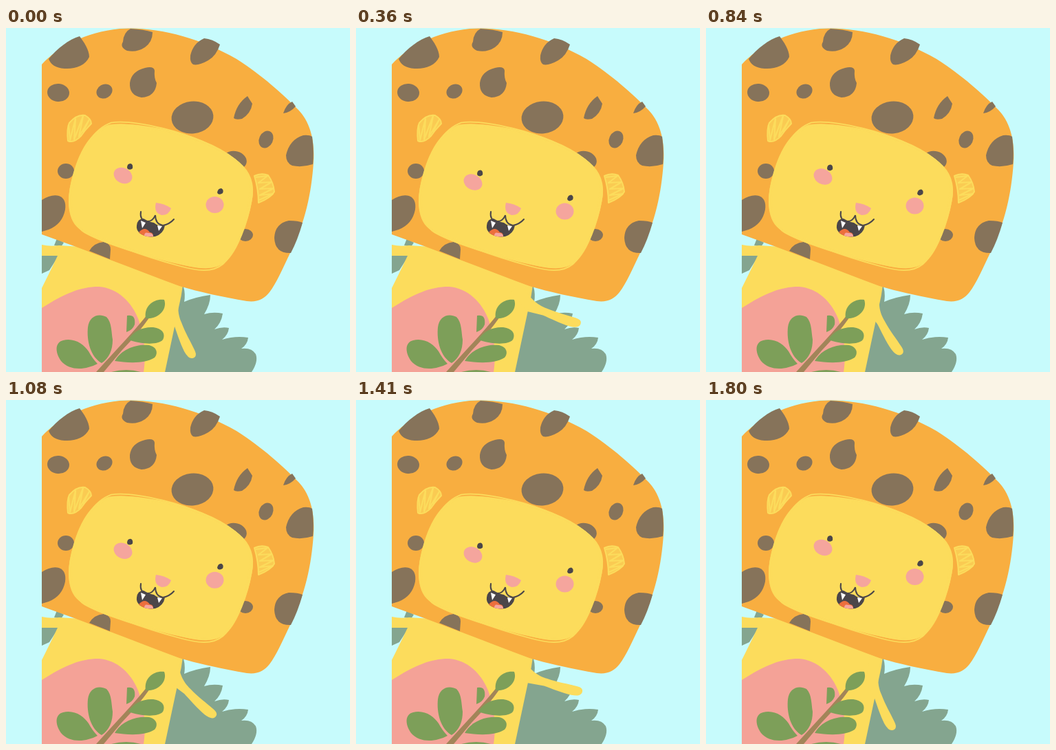
An HTML page for the animation above (1.83 s loop, 500x500 px).

```html
<!DOCTYPE html>
<html>
<head>
<meta charset="utf-8">
<style>
html, body { margin: 0; width: 100%; height: 100%; overflow: hidden; background: #c7fbfc; }
svg { display: block; width: 100vw; height: 100vh; }
</style>
</head>
<body>
<svg viewBox="0 0 500 500">
  <defs>
    <clipPath id="crop"><path d="M52 0H500V500H52Z"/></clipPath>
    <path id="outline" d="M150 144C170 140 200 145 225 150C270 159 311 176 336 196C355 211 359 230 355 250C350 280 335 322 318 337C302 350 280 347 255 341C200 328 140 309 111 292C90 279 92 246 97 225C105 190 120 155 150 144Z"/>
  </defs>
  <g clip-path="url(#crop)">
    <g id="bush" fill="#84a58f">
      <path d="M230 500L252 376L258 376Q261 387 259 398Q275 391 297 388Q297 401 288 416Q301 412 315 415Q313 429 303 438Q314 434 324 436Q323 446 314 453Q333 447 352 450Q351 460 342 466Q357 464 363 474Q367 485 357 500Z"/>
      <path d="M52 329H78L63 352L52 357ZM70 316L74 306L84 312L80 318Z"/>
    </g>
    <g id="body" fill="#fcdc5c">
      <path d="M52 315Q64 318 77 316L110 318L257 374Q255 390 251 406L231 500H52V378Q66 350 75 331H52Z"/>
      <path fill="#f4a297" d="M52 407C85 386 108 376 135 376C162 378 183 398 193 425C203 455 203 480 200 500H52Z"/>
    </g>
    <path id="arm" fill="#fcdc5c" d="M257 374C248 400 249 414 255 428C261 444 268 455 274 468Q279 478 271 480Q265 481 259 470C253 458 248 442 244 431L232 410L238 374Z"/>
    <g id="plant" fill="#7d9f59">
      <path fill="#a28559" d="M131 500L163 465Q190 436 205 417L209 420Q193 443 168 469L142 500Z"/>
      <path d="M203 422C200 404 215 393 230 395C235 409 221 424 203 422Z"/>
      <path d="M176 418Q189 416 187 431Q184 439 175 442Z"/>
      <path d="M139 487C123 478 117 455 119 435C121 418 135 414 146 420C154 428 153 442 155 453C155 468 150 480 139 487Z"/>
      <path d="M178 453C185 440 200 434 214 435C228 437 232 445 228 453C221 462 193 459 178 453Z"/>
      <path d="M158 484C168 466 190 459 208 461C220 464 221 473 216 479C203 488 178 487 158 484Z"/>
      <path d="M133 488C116 497 93 499 80 484C71 471 71 457 83 454C100 450 113 460 120 470Q126 481 133 488Z"/>
      <path d="M153 500Q175 494 196 500Z"/>
    </g>
    <path id="mane" fill="#f8ae40" d="M52 53C75 28 115 6 165 1C215 -3 280 13 335 45C375 71 400 94 425 119C443 138 449 165 447 195C444 240 435 282 414 325C403 348 393 371 383 384C375 394 365 399 350 397C315 391 282 384 252 375C190 352 120 324 52 300Z"/>
    <g id="spots" fill="#86735a">
      <path d="M62 45C74 30 92 16 107 12C113 20 121 32 121 42C115 55 100 60 85 59C72 58 65 53 62 45Z"/>
      <path d="M170 20Q171 6 181 1Q200 2 213 6Q213 20 202 28Q190 36 176 33Q165 28 170 20Z"/>
      <path d="M180 80Q182 63 202 58Q215 55 216 62Q215 73 219 80Q217 100 197 101Q179 98 180 80Z"/>
      <path d="M268 40Q272 22 288 15Q300 16 311 24Q306 40 294 47Q280 55 272 53Q267 50 268 40Z"/>
      <path d="M331 131Q335 110 351 99Q354 104 358 110Q356 124 343 132Q334 134 331 131Z"/>
      <path d="M403 124Q407 111 416 107L421 114Q413 123 403 124Z"/>
      <path d="M407 185Q412 162 432 156Q441 155 445 158Q448 180 446 198Q430 203 416 200Q407 196 407 185Z"/>
      <path d="M390 305Q391 284 411 280Q425 280 431 283Q424 308 414 327Q391 328 390 305Z"/>
      <path d="M52 250Q66 241 77 244Q88 248 86 264Q82 285 62 293L52 296Z"/>
      <path d="M121 324Q128 312 142 311Q153 314 152 322L151 336Z"/>
    </g>
    <g id="ears" fill="none" stroke="#fcdc5c" stroke-linejoin="round"></g>
    <g id="face" fill="none" stroke="#fcdc5c" stroke-width="1.7"></g>
    <g id="mouth">
      <path fill="#f5a59d" d="M218 254Q230 255 240 262Q237 272 226 272Q214 268 218 254Z"/>
      <path fill="#4b4649" d="M190 287Q191 277 200 277Q208 282 215 283Q222 289 231 287Q229 299 217 303Q203 305 194 298Q189 293 190 287Z"/>
      <path fill="#ec6f3d" d="M193 297Q202 287 209 297Q214 297 214 303Q202 305 193 297Z"/>
      <path fill="#f5a59d" d="M201 302Q201 296 207 298Q214 298 214 303Q208 304 201 302Z"/>
      <path fill="#fff" d="M196 280L203 283L198 291ZM220 287L227 288L222 295Z"/>
      <path fill="none" stroke="#4b4649" stroke-width="2" stroke-linecap="round" d="M196 267Q194 279 204 281Q213 282 217 272Q217 285 228 287Q238 285 244 278"/>
    </g>
    <g id="eyes">
      <path fill="#4b4649" d="M176 203Q176 197 181 197Q185 198 184 204Q181 207 177 205ZM307 239Q308 233 313 233Q317 235 315 240Q311 243 308 241Z"/>
      <ellipse fill="#f5a59d" cx="170" cy="214.5" rx="14" ry="11" transform="rotate(28 170 214.5)"/>
      <ellipse fill="#f5a59d" cx="303.5" cy="257" rx="13" ry="12"/>
    </g>
  </g>
</svg>
<script>
const NS = "http://www.w3.org/2000/svg";
const $ = id => document.getElementById(id);

function add(parent, tag, attrs) {
  const node = document.createElementNS(NS, tag);
  for (const key in attrs) node.setAttribute(key, attrs[key]);
  parent.append(node);
  return node;
}

// Round spots: centre, radii, tilt
[
  [76, 94, 16, 13, 5], [143, 92, 12, 10, -30], [271, 130, 30.5, 23.5, -6],
  [378, 162, 10, 13, 25], [87, 208, 12, 11, 0], [333, 192, 17, 13, 15],
  [348, 301, 11, 9, 0]
].forEach(([cx, cy, rx, ry, tilt]) =>
  add($("spots"), "ellipse", { cx, cy, rx, ry, transform: `rotate(${tilt} ${cx} ${cy})` }));

// Pencil loops around the face
const face = $("face");
add(face, "use", { href: "#outline", fill: "#fcdc5c" });
for (let i = 0; i < 6; i++) {
  const turn = 1.8 * Math.sin(i * 2.3);
  const sx = 1 + 0.014 * Math.cos(i * 1.9), sy = 1.022 + 0.024 * Math.sin(i * 1.4);
  add(face, "use", {
    href: "#outline",
    transform: `translate(225 246) rotate(${turn}) scale(${sx} ${sy}) translate(-225 -246)`
  });
}

function ear(d, hatch) {
  add($("ears"), "path", { d, fill: "#fcdc5c", "fill-opacity": 0.65, "stroke-width": 2 });
  add($("ears"), "path", { d: hatch, "stroke-width": 2.2 });
}
ear("M90 164Q88 146 92 138Q103 125 115 127Q124 132 124 139Q115 148 109 157Q98 168 90 164Z",
    "M91 141L93 163L101 132L99 162L112 128L106 158L121 133L112 151");
ear("M361 215Q371 210 381 214Q389 225 390 238Q385 247 367 254Q367 235 361 215Z",
    "M363 217L380 215L367 225L386 224L369 234L389 233L369 243L388 241L368 250");

const STEP = 30, LOOP = 1830, HALF = 450;

function draw(now) {
  const time = Math.floor((now % LOOP) / STEP) * STEP;
  const lift = 1 - Math.abs((time % (2 * HALF)) / HALF - 1);
  $("arm").setAttribute("transform", `rotate(${-58 * lift} 242 392)`);
  $("eyes").setAttribute("transform", `translate(0 ${12 * lift})`);
}

const start = performance.now();
function tick() {
  draw(performance.now() - start);
  requestAnimationFrame(tick);
}
tick();
</script>
</body>
</html>
```
